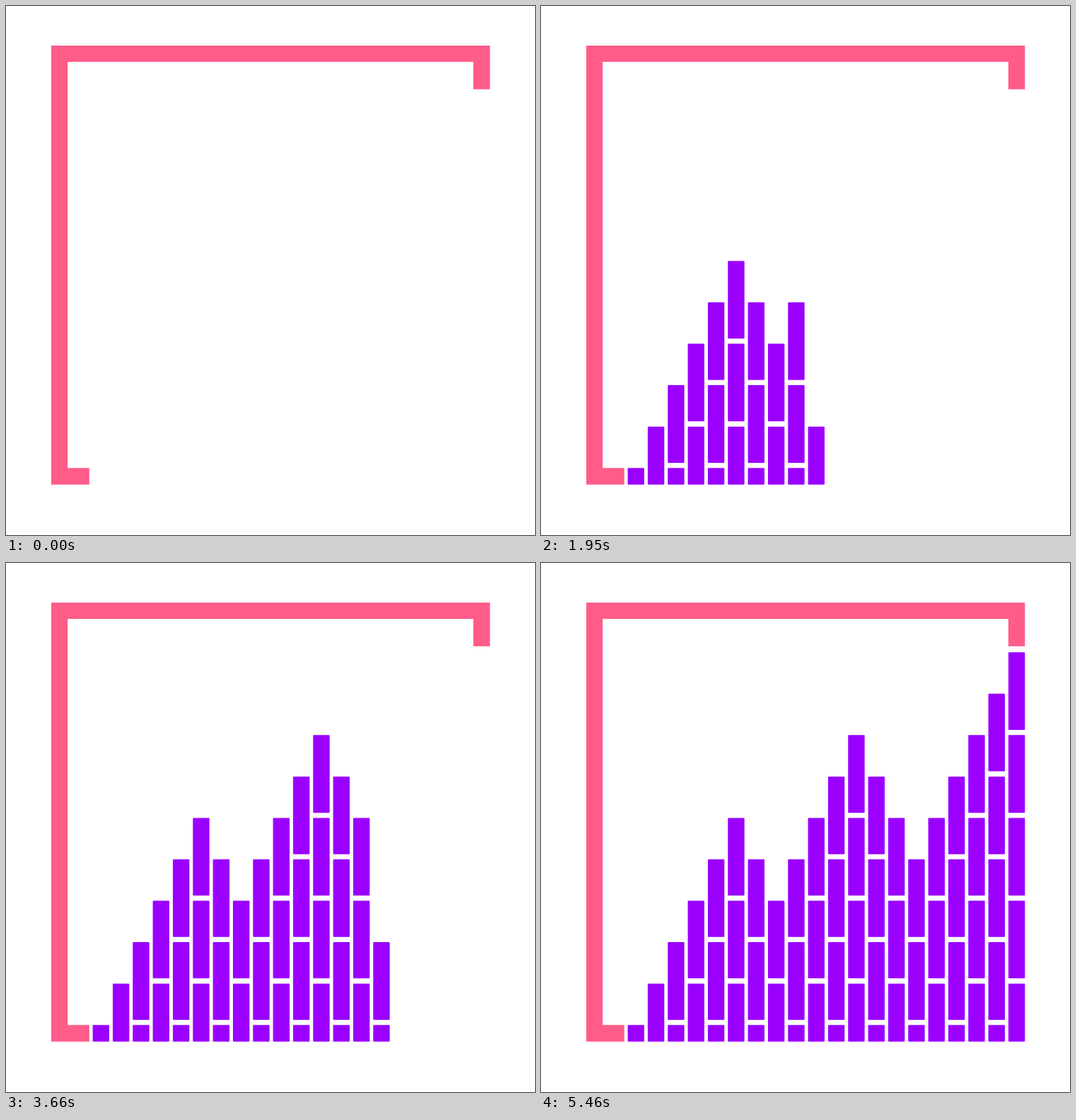
Animation of 748 by 748 pixels, one loop 8100 ms. Source, as an HTML page:

```html
<!DOCTYPE html>
<html lang="en">
<head>
<meta charset="utf-8">
<title>Brick steps</title>
<style>
html, body { margin: 0; width: 100%; height: 100%; overflow: hidden; background: #fff; }
svg { display: block; width: 100vw; height: 100vh; }
</style>
</head>
<body>
<svg viewBox="0 0 748 748">
  <path fill="#ff5c8a" d="M64 56H684.3V117.7H660.8V79H87.2V653.2H117.8V676.7H64Z"/>
  <g id="wall" fill="#9b00ff"></g>
</svg>
<script>
const LOOP = 8100, START = 150, STEP = 90, LAST = 5460;
const LEFT = 122.6, PITCH = 28.33, WIDTH = 23.4;
const FLOOR = 676.7, BASE = 653.2, RISE = 58.55, BRICK = 109.8;

// Height of each column, in half-brick rises
const heights = [0, 1, 2, 3, 4, 5, 4, 3, 4, 5, 6, 7, 6, 5, 4, 5, 6, 7, 8, 9];
const wall = document.getElementById('wall');
const bricks = [];

function addBrick(col, level) {
  const y = BASE - level * RISE;
  const rect = document.createElementNS('http://www.w3.org/2000/svg', 'rect');
  const attrs = {
    x: LEFT + col * PITCH, y, width: WIDTH,
    height: Math.min(BRICK, FLOOR - y), rx: 1
  };
  for (const key in attrs) rect.setAttribute(key, attrs[key]);
  wall.appendChild(rect);
  bricks.push(rect);
}

heights.forEach((h, col) => {
  for (let level = h % 2; level <= h; level += 2) addBrick(col, level);
});

function draw(ms) {
  const t = ms % LOOP;
  // The top of the final column lands all at once
  const count = t >= LAST ? bricks.length : Math.floor((t - START) / STEP) + 1;
  bricks.forEach((b, i) => b.setAttribute('visibility', i < count ? 'visible' : 'hidden'));
}

const begin = performance.now();
function tick() {
  draw(performance.now() - begin);
  requestAnimationFrame(tick);
}
draw(0);
requestAnimationFrame(tick);
</script>
</body>
</html>
```
